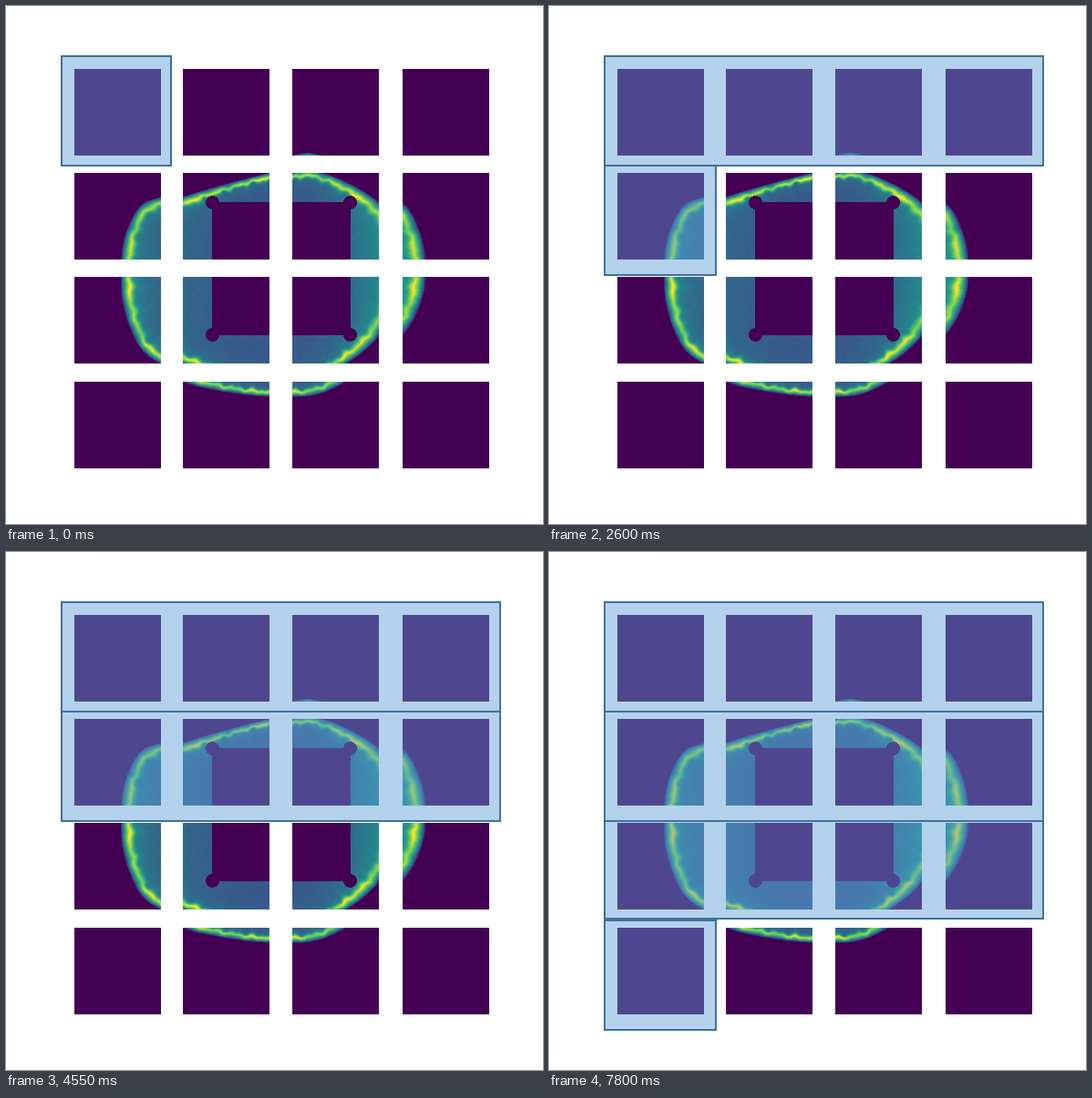
An HTML page with a canvas for the animation above (8 s loop, 589 by 568 pixels).

```html
<!DOCTYPE html>
<html>
<head>
<meta charset="utf-8">
<style>
html, body { margin: 0; width: 100%; height: 100%; overflow: hidden; background: #fff; }
canvas { display: block; }
</style>
</head>
<body>
<canvas id="stage" width="589" height="568"></canvas>
<script>
const LOOP = 8000, STEP = 650, TILE = 95, SIZE = TILE * 4;
const COLS = [75, 194, 314, 434.5], ROWS = [69, 183, 297, 411.5];
const CENTRE = { x: 182, y: 196 };

// Key points of the slice outline, joined by a smooth closed curve
const KEYS = [
  [95, 121], [142, 107], [189, 95], [210, 92], [241, 101], [276, 120],
  [297, 141], [310, 180], [308, 212], [293, 245], [266, 274], [226, 297],
  [189, 302], [131, 295], [92, 284], [68, 262], [52, 215], [54, 168], [71, 132]
];
const VIRIDIS = [[68, 1, 84], [59, 82, 139], [33, 145, 140], [94, 201, 98], [253, 231, 37]];

let seed = 7;
function random() {
  seed = (seed * 16807) % 2147483647;
  return seed / 2147483647;
}

function colour(value) {
  const v = Math.max(0, Math.min(1, value)) * 4, i = Math.min(3, Math.floor(v));
  return VIRIDIS[i].map((c, k) => c + (VIRIDIS[i + 1][k] - c) * (v - i));
}

// Catmull-Rom spline through the key points
function smoothOutline(parts) {
  const key = i => KEYS[(i + KEYS.length) % KEYS.length], points = [];
  KEYS.forEach((p, i) => {
    const a = key(i - 1), b = key(i + 1), c = key(i + 2);
    for (let n = 0; n < parts; n++) {
      const t = n / parts;
      points.push([0, 1].map(k => p[k] + .5 * t * (b[k] - a[k]
        + t * (2 * a[k] - 5 * p[k] + 4 * b[k] - c[k]
        + t * (3 * (p[k] - b[k]) + c[k] - a[k])))));
    }
  });
  return points;
}
const outline = smoothOutline(4);

function inHole(x, y) {
  const dx = Math.abs(x - 190.5), dy = Math.abs(y - 190.5);
  return dx < 64 && dy < 64 || Math.hypot(dx - 63, dy - 63) < 7.5;
}

// Distance to the outline, 0 outside it
function depthInside(x, y) {
  let inside = false, nearest = Infinity;
  outline.forEach((a, i) => {
    const b = outline[(i + 1) % outline.length], dx = b[0] - a[0], dy = b[1] - a[1];
    if ((a[1] > y) !== (b[1] > y) && x < a[0] + dx * (y - a[1]) / dy) inside = !inside;
    const s = Math.max(0, Math.min(1, ((x - a[0]) * dx + (y - a[1]) * dy) / (dx * dx + dy * dy)));
    nearest = Math.min(nearest, Math.hypot(x - a[0] - s * dx, y - a[1] - s * dy));
  });
  return inside ? nearest : 0;
}

// A bright, uneven rim that fades into the darker tissue
function intensity(x, y) {
  const d = inHole(x, y) ? 0 : depthInside(x, y);
  if (!d) return 0;
  const angle = Math.atan2(y - CENTRE.y, x - CENTRE.x), c = Math.cos(angle);
  const rim = 5 + c + 5 * c * c + .7 * Math.sin(31 * angle) + .5 * Math.sin(53 * angle);
  const peak = .9 + .07 * Math.cos(8 * angle) + .05 * Math.sin(23 * angle);
  const noise = (random() - .5) * .05;
  if (d < rim) return peak * Math.pow(d / rim, .75) + noise;
  const side = (x - CENTRE.x) / 130, fall = (d - rim) / rim;
  const base = .28 + (side > 0 ? .26 : .12) * side * side;
  const glow = .75 * Math.exp(-((fall / .5) ** 2)) + .25 * Math.exp(-fall);
  return base + (peak - base) * glow + noise;
}

function drawSlice() {
  const art = document.createElement("canvas");
  art.width = art.height = SIZE;
  const c = art.getContext("2d"), image = c.createImageData(SIZE, SIZE);
  for (let y = 0; y < SIZE; y++) {
    for (let x = 0; x < SIZE; x++) {
      image.data.set([...colour(intensity(x + .5, y + .5)), 255], (y * SIZE + x) * 4);
    }
  }
  c.putImageData(image, 0, 0);
  return art;
}

const ctx = document.getElementById("stage").getContext("2d");
const slice = drawSlice();

// Top and bottom of each highlighted row, and its right edge by cell count
const BANDS = [[55, 175], [175, 295], [295, 402], [404, 524]];
const FIRST_RIGHT = [181, 301, 420, 542], RIGHT = [183, 305, 422, 542];

function draw(time) {
  const count = Math.floor((time % LOOP) / STEP) + 1;
  ctx.fillStyle = "#fff";
  ctx.fillRect(0, 0, 589, 568);
  ROWS.forEach((y, r) => COLS.forEach((x, c) =>
    ctx.drawImage(slice, c * TILE, r * TILE, TILE, TILE, x, y, TILE, TILE)));

  ctx.fillStyle = "rgba(91,155,213,.455)";
  ctx.strokeStyle = "#41719c";
  ctx.lineWidth = 2;
  BANDS.forEach(([top, bottom], r) => {
    const cells = Math.min(4, count - r * 4);
    if (cells < 1) return;
    const right = (r ? RIGHT : FIRST_RIGHT)[cells - 1];
    const box = [61, top, right - 61, bottom - top];
    ctx.fillRect(...box);
    ctx.strokeRect(...box);
  });
}

const start = performance.now();
function tick() {
  draw(performance.now() - start);
  requestAnimationFrame(tick);
}
tick();
</script>
</body>
</html>
```
